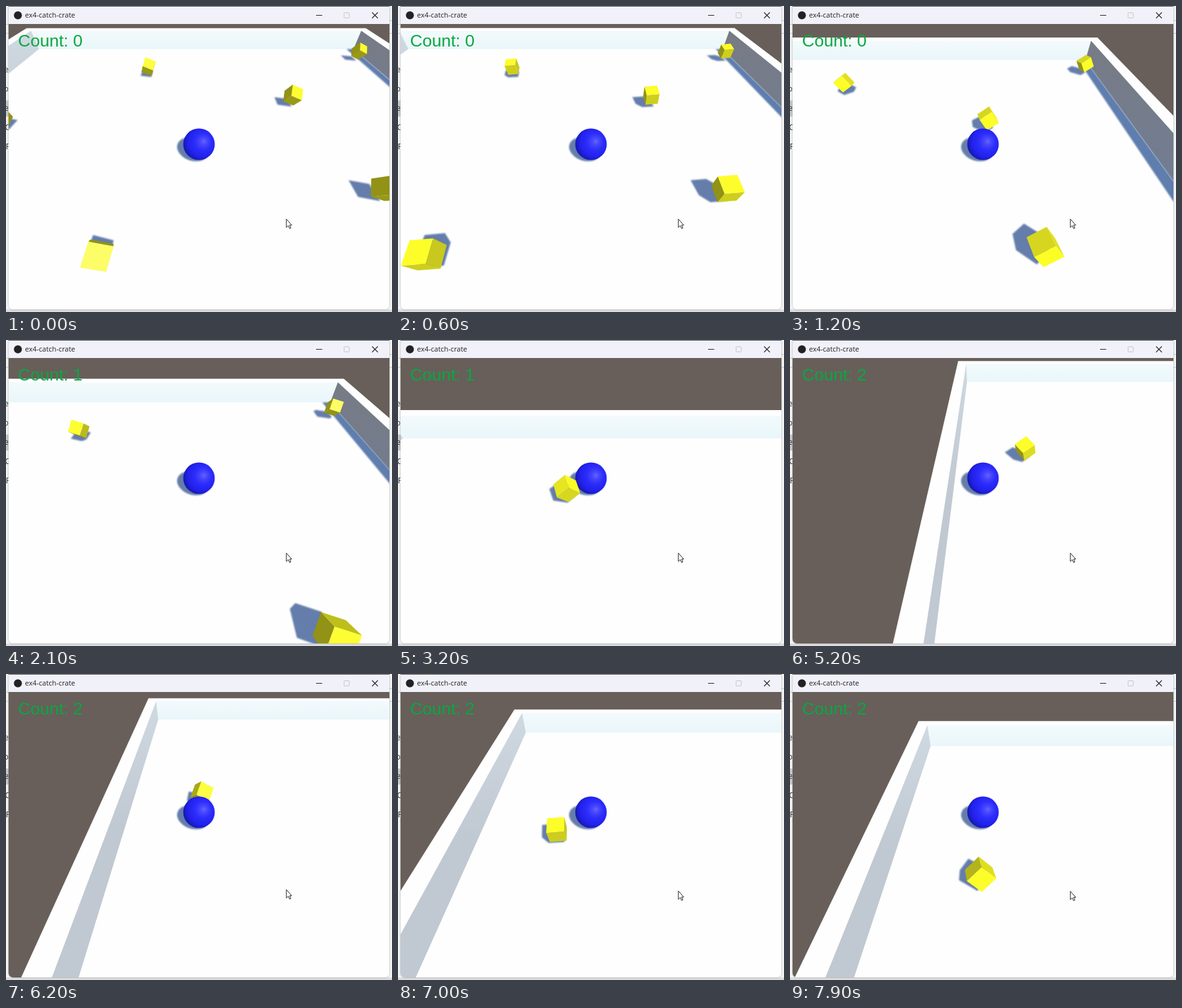
An HTML page with a canvas that plays this animation: 600 by 476 pixels, repeating every 8000 ms.

```html
<!DOCTYPE html>
<html lang="en">
<head>
<meta charset="utf-8">
<title>Rolling ball</title>
<style>
  html, body { margin: 0; width: 100%; height: 100%; overflow: hidden; }
  body { position: relative; background: #dcdcde; }
  .stage { position: absolute; left: 0; top: 0; width: 600px; height: 476px; overflow: hidden; }
  .edge { position: absolute; top: 0; width: 8px; height: 472px; background: #f4f4f5; overflow: hidden; }
  .edge span { position: absolute; right: 4px; font: 12px "Open Sans", sans-serif; line-height: 16px; color: #333; }
  .edge i { position: absolute; left: 0; width: 8px; background: #c9c9cc; }
  .window { position: absolute; left: 4px; top: 0; width: 592px; height: 472px; background: #fff;
    border-radius: 0 0 7px 7px; overflow: hidden; box-shadow: 0 0 2px #777; }
  .bar { position: absolute; left: 0; top: 0; width: 592px; height: 28px; background: #f1f1f9;
    border-top: 1px solid #55555a; box-sizing: border-box; }
  canvas { position: absolute; left: 0; top: 28px; }
  svg { position: absolute; left: 0; top: 0; }
  .title { font: 11px "Open Sans", sans-serif; fill: #222; }
  .count { font: 26.5px "Liberation Sans", Arial, sans-serif; fill: #08a840; }
</style>
</head>
<body>
<div class="stage">
  <div class="edge" style="left:0">
    <i style="top:28px;height:1px"></i><i style="top:42px;height:1px"></i><i style="top:147px;height:25px"></i>
    <span style="top:91px">re</span><span style="top:121px">to</span><span style="top:151px">re</span>
    <span style="top:181px;right:2px">C</span><span style="top:211px;right:2px">F</span>
  </div>
  <div class="edge" style="left:592px">
    <i style="top:22px;height:1px"></i><i style="top:42px;height:1px"></i>
  </div>
  <div class="window">
    <div class="bar"></div>
    <canvas id="view" width="592" height="444"></canvas>
  </div>
  <svg width="600" height="476" viewBox="0 0 600 476">
    <circle cx="18.5" cy="14.5" r="6.2" fill="#222"/>
    <text class="title" x="29.5" y="18">ex4-catch-crate</text>
    <path d="M482 14.5h9.5" stroke="#222" fill="none"/>
    <rect x="525.5" y="10.5" width="8" height="8" rx="1" stroke="#c4c4ca" fill="none"/>
    <path d="M569 10l9 9m0-9l-9 9" stroke="#222" fill="none" stroke-width="1.1"/>
    <text class="count" id="count" x="18.8" y="63.3">Count: 0</text>
    <path id="cursor" d="M0 0V13L3 10.2L5 14.6L7 13.7L5.1 9.4H8.4Z" fill="#fff" stroke="#222" stroke-width="1"/>
  </svg>
</div>
<script>
const LOOP = 8000, STEP = 100;
const FOCAL = 384.5, CX = 300, CY = 250;
const CAM_UP = 5.5, CAM_BACK = 6;
const LEFT = -9.6, RIGHT = 9.27, BACK = 9.75, THICK = 0.5;
const LIGHT = [0.321, 0.766, -0.557];
const SHADE = '#647dab';

// time, x, z of the ball on the floor
const PATH = [
  [0, 0, .26], [450, .9, .15], [900, 2.45, .72], [1200, 3.6, 1.89], [1480, 3.95, 2.55],
  [1850, 3.2, 2.1], [2400, 1.35, 4.4], [2850, -.35, 6.5], [3200, -1.69, 6.54],
  [4200, -4.88, 2.66], [4500, -6.05, 1.4], [4900, -7.65, .02], [5200, -8.63, .05],
  [5340, -8.95, .08], [5550, -8.65, .13], [6200, -7.2, .67], [6750, -6.15, 1.75],
  [7300, -6.3, 3.38], [7900, -7.03, 4.09]
];
// x, z and the time of pick-up
const CUBES = [
  [-2.42, 6.05, 3300], [3.78, 3.32, 1400], [8.6, 8.04, Infinity],
  [4.94, -1.56, Infinity], [-2.13, -3.37, Infinity], [-7.1, 1.72, Infinity]
];
const CURSOR = [[0, 331.5], [5600, 331.5], [6100, 335.5], [6500, 335.5], [7100, 338], [8000, 338]];

// cube axes at SPIN_REF, turning about SPIN_AXIS
const SPIN_AXIS = [.551, -.166, .818], SPIN_RATE = 56.12, SPIN_REF = 4200;
const AXES = [[.955, -.21, .21], [.046, .803, .593], [.292, .554, -.781]];

const ctx = document.getElementById('view').getContext('2d');
const countText = document.getElementById('count');
const cursor = document.getElementById('cursor');
let ball = [0, 0];

const dot = (a, b) => a[0] * b[0] + a[1] * b[1] + a[2] * b[2];
const add = (a, b, k = 1) => a.map((v, i) => v + b[i] * k);
const cross = (a, b) => [a[1] * b[2] - a[2] * b[1], a[2] * b[0] - a[0] * b[2], a[0] * b[1] - a[1] * b[0]];
const unit = a => a.map(v => v / Math.hypot(...a));

function turn(v, angle) {
  const c = Math.cos(angle), s = Math.sin(angle);
  const w = cross(SPIN_AXIS, v), k = dot(SPIN_AXIS, v) * (1 - c);
  return v.map((p, i) => p * c + w[i] * s + SPIN_AXIS[i] * k);
}

function segment(table, t) {
  let i = 0;
  while (i < table.length - 2 && t >= table[i + 1][0]) i++;
  return i;
}

function smooth(t, col) {
  const i = segment(PATH, t), a = PATH[i], b = PATH[i + 1], h = b[0] - a[0];
  const slope = j => {
    const p = PATH[Math.max(j - 1, 0)], q = PATH[Math.min(j + 1, PATH.length - 1)];
    return (q[col] - p[col]) / (q[0] - p[0]);
  };
  const u = (t - a[0]) / h, u2 = u * u, u3 = u2 * u;
  return a[col] * (2 * u3 - 3 * u2 + 1) + slope(i) * h * (u3 - 2 * u2 + u) +
    b[col] * (3 * u2 - 2 * u3) + slope(i + 1) * h * (u3 - u2);
}

function linear(table, t) {
  const i = segment(table, t), a = table[i], b = table[i + 1];
  return a[1] + (b[1] - a[1]) * (t - a[0]) / (b[0] - a[0]);
}

// the camera follows the ball and looks down at 45 degrees
function project([x, y, z]) {
  const h = CAM_UP - y, d = z - ball[1] + CAM_BACK;
  return [CX + FOCAL * (x - ball[0]) * Math.SQRT2 / (d + h), CY - FOCAL * (d - h) / (d + h)];
}

function shape(points, fill) {
  ctx.beginPath();
  points.forEach(p => ctx.lineTo(p[0], p[1]));
  ctx.closePath();
  ctx.fillStyle = fill;
  ctx.fill();
}
const poly = (points, fill) => shape(points.map(project), fill);

function fade(y0, y1, from, to) {
  const g = ctx.createLinearGradient(0, y0, 0, y1);
  g.addColorStop(0, from);
  g.addColorStop(1, to);
  return g;
}

function hull(points) {
  const half = list => {
    const out = [];
    for (const p of list) {
      while (out.length > 1) {
        const [a, b] = out.slice(-2);
        if ((b[0] - a[0]) * (p[1] - a[1]) - (b[1] - a[1]) * (p[0] - a[0]) > 0) break;
        out.pop();
      }
      out.push(p);
    }
    return out.slice(0, -1);
  };
  const sorted = points.slice().sort((a, b) => a[0] - b[0] || a[1] - b[1]);
  return half(sorted).concat(half(sorted.reverse()));
}

function shadow(points) {
  ctx.filter = 'blur(1.1px)';
  shape(hull(points.map(p => project(add(p, LIGHT, -p[1] / LIGHT[1])))), SHADE);
  ctx.filter = 'none';
}

function drawArena() {
  const near = ball[1] - CAM_BACK;
  const wall = (x, fill) => poly([[x, 0, near], [x, 1, near], [x, 1, BACK], [x, 0, BACK]], fill);
  const l = LEFT - THICK, r = RIGHT + THICK, b = BACK + THICK;
  ctx.fillStyle = '#685f5a';
  ctx.fillRect(0, 0, 600, 476);
  poly([[l, 1, near], [l, 1, b], [r, 1, b], [r, 1, near]], '#fefefe');

  const top = project([0, 1, BACK])[1], base = project([0, 0, BACK])[1];
  poly([[LEFT, 0, BACK], [LEFT, 1, BACK], [RIGHT, 1, BACK], [RIGHT, 0, BACK]],
    fade(top, base, '#f3fafc', '#e9f6fa'));
  wall(LEFT, fade(top, top + 200, '#cfd9e1', '#c0c8d1'));

  const cast = LIGHT[0] / LIGHT[1];
  ctx.filter = 'blur(1px)';
  poly([[RIGHT, 0, near], [RIGHT, 0, BACK], [RIGHT - cast, 0, BACK], [RIGHT - cast, 0, near]], '#5f7dad');
  ctx.filter = 'none';
  wall(RIGHT, fade(top, top + 220, '#777b85', '#727d92'));
}

function corners(pos, axes) {
  const out = [];
  for (const i of [-.25, .25]) for (const j of [-.25, .25]) for (const k of [-.25, .25])
    out.push(add(add(add(pos, axes[0], i), axes[1], j), axes[2], k));
  return out;
}

function drawCube(pos, axes) {
  const eye = [ball[0], CAM_UP, ball[1] - CAM_BACK];
  axes.forEach((axis, i) => [-1, 1].forEach(sign => {
    const n = axis.map(v => v * sign), mid = add(pos, n, .25);
    const view = unit(add(eye, mid, -1));
    if (dot(n, view) <= 0) return;
    const a = axes[(i + 1) % 3], b = axes[(i + 2) % 3];
    const lit = Math.max(0, dot(n, LIGHT));
    const shine = Math.max(0, dot(n, unit(add(LIGHT, view)))) ** 24;
    const level = Math.min(253, 146 + 150 * lit);
    const quad = [[-1, -1], [1, -1], [1, 1], [-1, 1]]
      .map(([p, q]) => add(add(mid, a, p * .25), b, q * .25));
    poly(quad, `rgb(${level},${level},${22 + 22 * lit + 62 * shine})`);
  }));
}

function drawBall() {
  const g = ctx.createRadialGradient(308, 210.5, 0, 305, 212, 30);
  g.addColorStop(0, '#6464ff');
  g.addColorStop(.2, '#4545ff');
  g.addColorStop(.45, '#2c2cfc');
  g.addColorStop(.75, '#2222ee');
  g.addColorStop(1, '#1717ac');
  ctx.beginPath();
  ctx.arc(300, 215, 24.5, 0, 2 * Math.PI);
  ctx.fillStyle = g;
  ctx.fill();
}

function ballShadow() {
  const side = unit([-LIGHT[2], 0, LIGHT[0]]), up = cross(LIGHT, side), rim = [];
  for (let a = 0; a < 2 * Math.PI; a += .15)
    rim.push(add(add([ball[0], .5, ball[1]], side, .5 * Math.cos(a)), up, .5 * Math.sin(a)));
  shadow(rim);
}

function draw(t) {
  ball = [smooth(t, 1), smooth(t, 2)];
  const angle = SPIN_RATE * (t - SPIN_REF) / 1000 * Math.PI / 180;
  const axes = AXES.map(v => turn(v, angle));
  const cubes = CUBES
    .filter(([, z, end]) => t < end && z > ball[1] - CAM_BACK + .5)
    .map(([x, z]) => [x, .5, z])
    .sort((a, b) => b[2] - a[2]);

  ctx.setTransform(1, 0, 0, 1, -4, -28);
  drawArena();
  cubes.forEach(c => shadow(corners(c, axes)));
  ballShadow();
  cubes.filter(c => c[2] >= ball[1]).forEach(c => drawCube(c, axes));
  drawBall();
  cubes.filter(c => c[2] < ball[1]).forEach(c => drawCube(c, axes));

  countText.textContent = 'Count: ' + CUBES.filter(c => t >= c[2]).length;
  cursor.setAttribute('transform', `translate(435.8 ${linear(CURSOR, t)})`);
}

const start = performance.now();
function tick() {
  const t = (performance.now() - start) % LOOP;
  draw(Math.floor(t / STEP) * STEP);
  requestAnimationFrame(tick);
}
tick();
</script>
</body>
</html>
```
